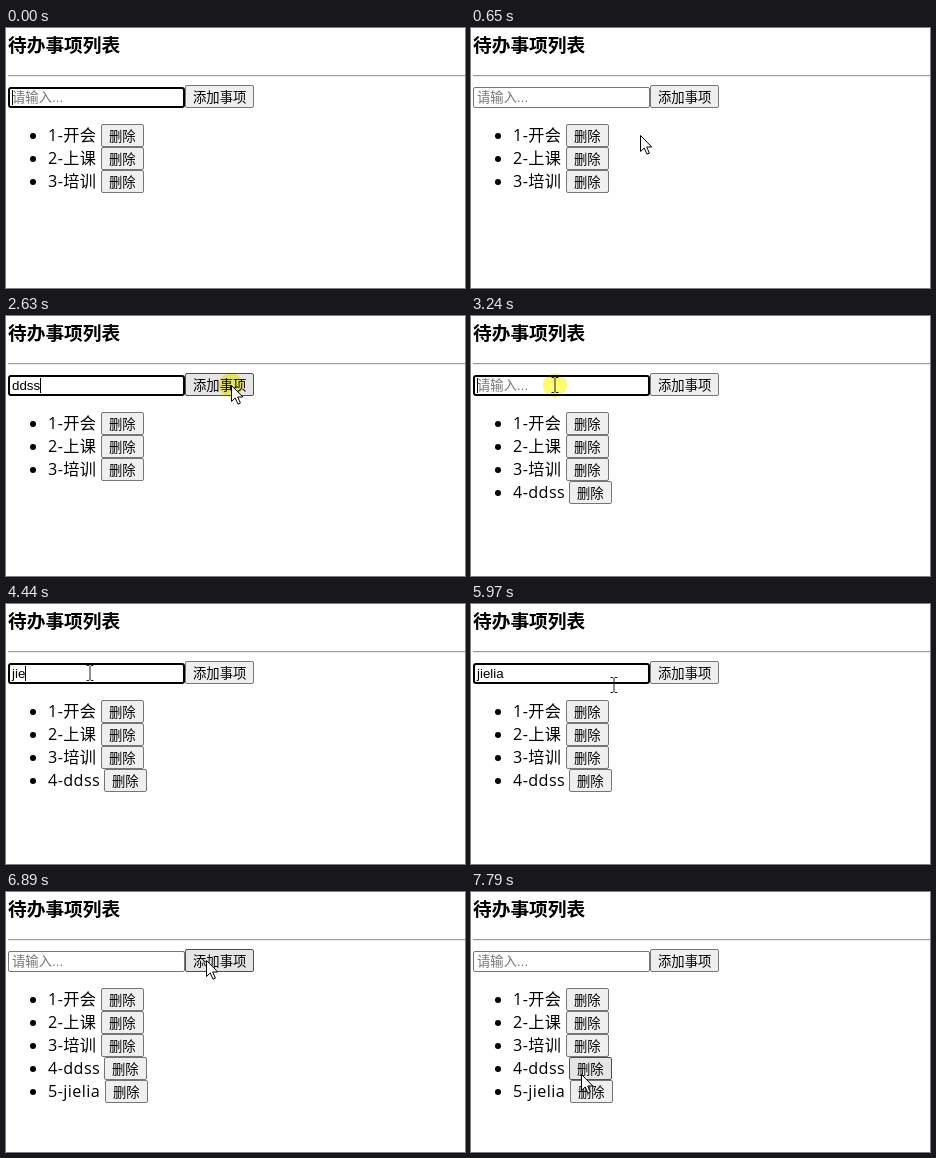
An HTML page that plays this animation: 459 by 260 pixels, repeating every 7.99 s.

```html
<!DOCTYPE html>
<html lang="zh-CN">
<meta charset="utf-8">
<title>待办事项列表</title>
<style>
html, body { margin: 0; width: 100%; height: 100%; overflow: hidden; background: #fff; }
svg { display: block; }
text { font-family: "Open Sans", "Noto Sans CJK SC", "Noto Sans CJK", sans-serif; white-space: pre; }
.h { font-size: 18.72px; font-weight: bold; }
.li { font-size: 16.2px; letter-spacing: .4px; }
.b { font-size: 13.33px; }
.in { font-size: 13.33px; font-family: "Liberation Sans", "Noto Sans CJK SC", "Noto Sans CJK", sans-serif; }
.btn rect { fill: #efefef; stroke: #767676; }
.btn.hover rect { fill: #e5e5e5; stroke: #4f4f4f; }
</style>
<svg width="459" height="260" viewBox="0 0 459 260">
  <text class="h" x="2" y="24">待办事项列表</text>
  <path d="M2 47.5H459" stroke="#9a9a9a"/>
  <path d="M2 48.5H459" stroke="#eee"/>
  <rect id="box" x="2.5" y="59.5" width="176" height="20" rx="1.5" fill="#fff" stroke="#767676"/>
  <rect id="ring" x="3" y="60" width="175" height="19" rx="2" fill="#fff" stroke="#000" stroke-width="2"/>
  <text class="in" id="hint" x="6" y="74" fill="#757575">请输入...</text>
  <text class="in" id="typed" x="6" y="74"></text>
  <rect id="caret" y="62" width="1" height="15"/>
  <g id="list"></g>
  <g id="mouse">
    <circle id="press" r="12" fill="#fdfb70" style="mix-blend-mode:multiply"/>
    <path id="arrow" d="M.5 .5V16.5L4.2 13L7 19.2L9.4 18.1L6.7 12H11.8Z" fill="#fff" stroke="#000"/>
    <path id="beam" d="M-3.5 -7.5H-1L0 -6.5L1 -7.5H3.5M0 -6.5V6.5M-3.5 7.5H-1L0 6.5L1 7.5H3.5" fill="none" stroke="#222"/>
  </g>
</svg>
<script>
const LOOP = 7990, TICK = 67, BLINK = 530;
const ADD1 = 2697, ADD2 = 6550;
const $ = id => document.getElementById(id);
const show = (el, on) => el.style.display = on ? '' : 'none';

// start time, number of ticks, goal x, goal y
const moves = [
  [70, 7, 228, 143],
  [650, 2, 110, 70], [784, 4, 109, 75],
  [1940, 3, 205, 92], [2220, 4, 225, 69], [2790, 3, 228, 165],
  [3030, 2, 84, 69],
  [5970, 1, 143, 81], [6037, 2, 170, 84], [6171, 3, 203, 72],
  [6750, 3, 200, 68], [6960, 5, 112, 107], [7295, 4, 104, 182],
  [7650, 3, 110, 182]
];
const presses = [[200, 320], [680, 880], [2560, 2690], [3170, 3300], [6480, 6550]];
const focused = [[0, 200], [680, ADD1], [3170, ADD2]];
const entries = [
  { text: 'ddss', keys: [1480, 1740, 1940, 2220], end: ADD1 },
  { text: 'jielia', keys: [4040, 4240, 4440, 4640, 4840, 5040], end: ADD2 }
];
const items = [
  ['1-开会', 95, 0], ['2-上课', 95, 0], ['3-培训', 95, 0],
  ['4-ddss', 98, ADD1], ['5-jielia', 99, ADD2]
];

const button = (x, y, w, h, label) => `<g class="btn">
  <rect x="${x + .5}" y="${y + .5}" width="${w - 1}" height="${h - 1}" rx="1.5"/>
  <text class="b" x="${x + 8}" y="${y + 17}">${label}</text></g>`;

$('list').innerHTML = button(179, 57, 69, 23, '添加事项') + items.map(([label, x], i) => {
  const y = 96 + 23 * i;
  return `<g class="item"><circle cx="27" cy="${y + 12}" r="3"/>
    <text class="li" x="42" y="${y + 17}">${label}</text>${button(x, y, 43, 23, '删除')}</g>`;
}).join('');
const rows = document.querySelectorAll('.item');
const buttons = [...document.querySelectorAll('.btn')].map(el => {
  const r = el.firstElementChild;
  return { el, box: ['x', 'y', 'width', 'height'].map(k => +r.getAttribute(k)) };
});

const within = (spans, t) => spans.find(([a, b]) => t >= a && t < b);

function mouseAt(t) {
  let x = 254, y = 255;
  for (const [start, ticks, gx, gy] of moves) {
    if (t < start) break;
    const p = Math.min(1, (Math.floor((t - start) / TICK) + 1) / ticks);
    x += (gx - x) * p;
    y += (gy - y) * p;
  }
  return [x, y];
}

function draw(t) {
  const focus = within(focused, t);
  const entry = entries.find(e => t >= e.keys[0] && t < e.end);
  const count = entry ? entry.keys.filter(k => k <= t).length : 0;
  const typed = entry ? entry.text.slice(0, count) : '';
  $('typed').textContent = typed;
  show($('hint'), !typed);
  show($('ring'), focus);
  show($('box'), !focus);

  const since = typed ? entry.keys[count - 1] : focus ? focus[0] : 0;
  show($('caret'), focus && (t - since) % (2 * BLINK) < BLINK);
  $('caret').setAttribute('x', Math.round(6 + (typed ? $('typed').getComputedTextLength() : 0)));

  items.forEach((item, i) => show(rows[i], t >= item[2]));

  const [x, y] = mouseAt(t).map(Math.round);
  const overInput = x >= 2 && x < 179 && y >= 59 && y < 82;
  show($('mouse'), t >= 70);
  $('mouse').setAttribute('transform', `translate(${x} ${y})`);
  show($('press'), within(presses, t));
  show($('beam'), overInput);
  show($('arrow'), !overInput);
  for (const { el, box: [bx, by, w, h] } of buttons)
    el.classList.toggle('hover', t >= 70 && x >= bx && x <= bx + w && y >= by && y <= by + h);
}

const begin = performance.now();
function frame() {
  draw((performance.now() - begin) % LOOP);
  requestAnimationFrame(frame);
}
frame();
</script>
</html>
```
